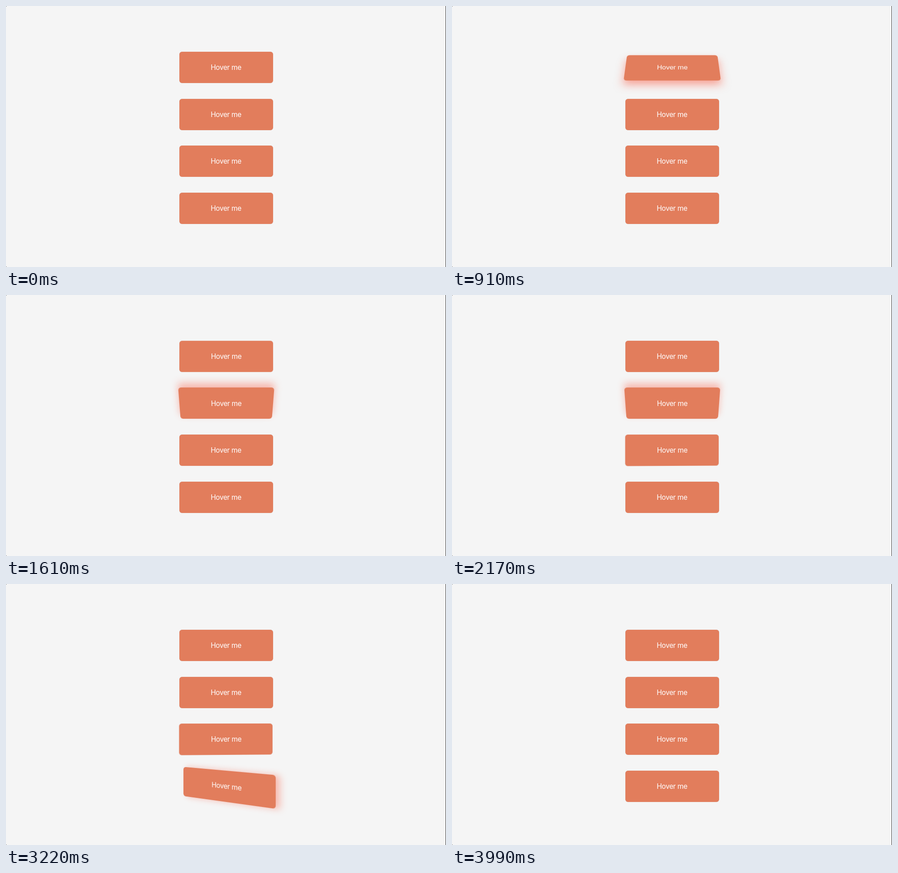
These frames come from a looping animation (972x576 px, 4060 ms). An HTML page:

```html
<!DOCTYPE html>
<html lang="en">
<head>
<meta charset="utf-8">
<title>Hover buttons</title>
<style>
  html, body { margin: 0; width: 100%; height: 100%; overflow: hidden; background: #3a3a3a; }
  #panel {
    position: absolute; left: 0; top: 0; width: 971px; height: 576px;
    border-radius: 2px 0 0 2px; background: #f5f5f5;
  }
  .button {
    position: absolute; left: 382.5px; width: 207px; height: 69px;
    border-radius: 6px; background: #e27d5c; color: #fff;
    font: 15.5px/69px Inter, Roboto, sans-serif; letter-spacing: -.4px; text-align: center;
  }
</style>
</head>
<body>
<div id="panel"></div>
<script>
const LOOP = 4060, STEP = 70, EASE_MS = 400;

// enter/leave: hover times; sx, sy: scale; skew: vertical shear;
// px, py: perspective terms; dx, dy: shadow offset
const buttons = [
  { enter: 336,  leave: 1240, sx: 1,    sy: .81, skew: 0,     px: 0,       py: -.00107, dx: 0,   dy: 11 },
  { enter: 1320, leave: 2045, sx: 1,    sy: 1,   skew: 0,     px: 0,       py: .00092,  dx: 0,   dy: -11 },
  { enter: 2110, leave: 2894, sx: .964, sy: 1,   skew: -.046, px: .000935, py: 0,       dx: -11, dy: 0 },
  { enter: 2950, leave: 3560, sx: .973, sy: 1,   skew: .148,  px: -.000935, py: 0,      dx: 11,  dy: 0 }
];

const panel = document.getElementById('panel');
buttons.forEach((b, i) => {
  b.el = document.createElement('div');
  b.el.className = 'button';
  b.el.textContent = 'Hover me';
  b.el.style.top = 101 + 103.5 * i + 'px';
  panel.append(b.el);
});

function ease(ms) {
  const x = Math.min(1, Math.max(0, ms / EASE_MS));
  return x * x * (3 - 2 * x);
}

function pose(b, t) {
  const p = ease(t - b.enter) - ease(t - b.leave);
  const scale = s => 1 + (s - 1) * p;
  const m = [
    scale(b.sx), b.skew * p, 0, b.px * p,
    0, scale(b.sy), 0, b.py * p,
    0, 0, 1, 0,
    0, 0, 0, 1
  ];
  b.el.style.transform = p > 0 ? `matrix3d(${m.map(v => v.toFixed(7))})` : 'none';
  b.el.style.boxShadow =
    `${b.dx * p}px ${b.dy * p}px ${19 * p}px rgba(250, 90, 65, ${.5 * p}), ` +
    `0 0 1px rgba(120, 60, 40, ${.4 * (1 - p)})`;
}

function draw() {
  const t = Math.floor(performance.now() % LOOP / STEP) * STEP;
  buttons.forEach(b => pose(b, t));
  requestAnimationFrame(draw);
}
draw();
</script>
</body>
</html>
```
